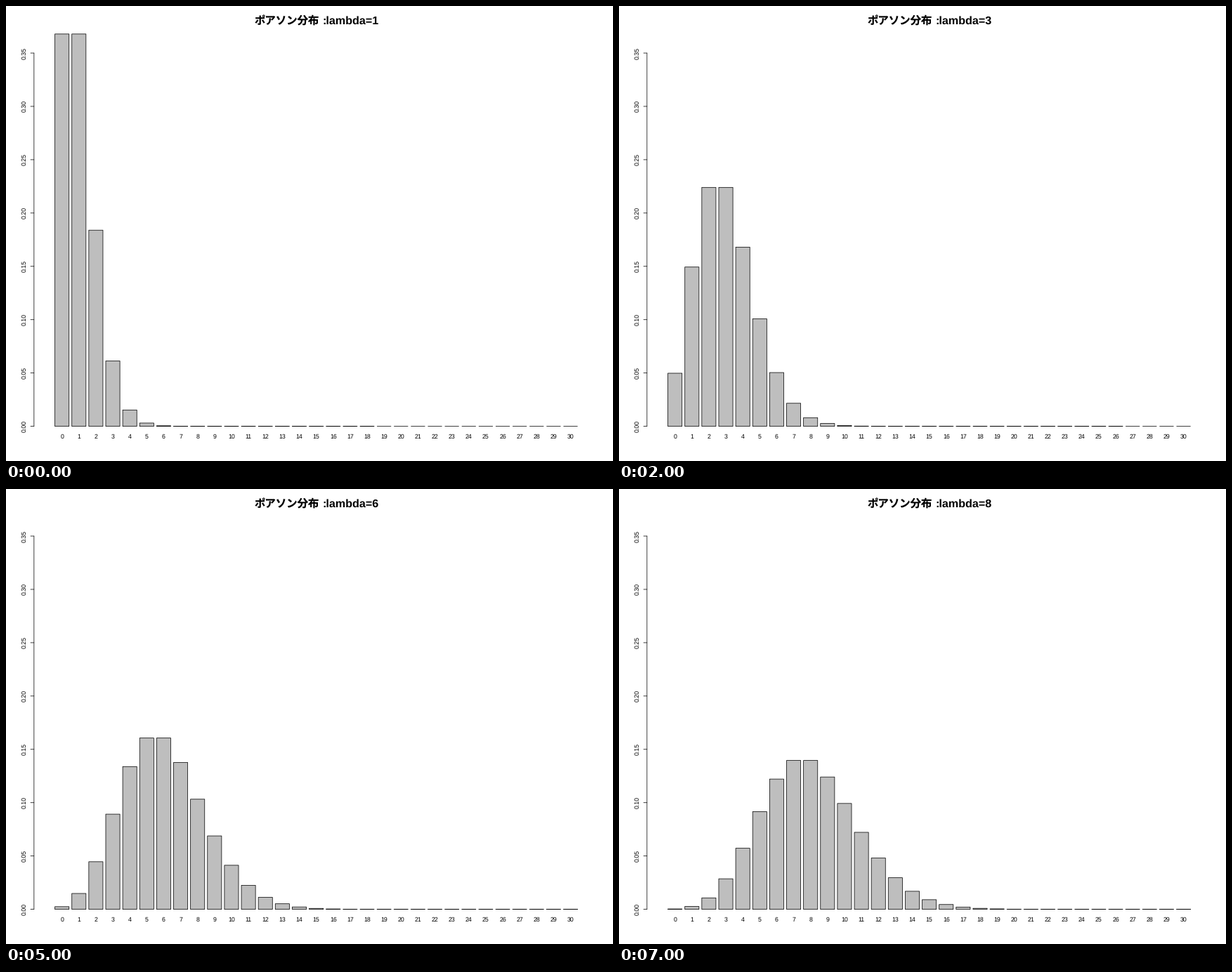
Animation, 864 px wide and 648 px high, one loop 8 s. Source, as a matplotlib script:

```python
import math

import matplotlib.pyplot as plt
from matplotlib.animation import FuncAnimation
from matplotlib.patches import Rectangle

W, H = 864, 648
LEFT, PITCH, BAR_W = 69.6, 24.13, 20.11
BASE, SCALE = 598.6, 1518.8
AXIS_X, TICK = 39.85, 4.85
STROKE = dict(lw=0.75, snap=False)
LINE = dict(color="black", solid_capstyle="round", **STROKE)
LABEL = dict(family="Liberation Sans", fontsize=8.8, ha="center",
             va="baseline", rotation_mode="anchor")
TITLE = dict(weight="bold", ha="left", va="baseline")

plt.rcParams["text.hinting"] = "none"
plt.rcParams["toolbar"] = "None"


def poisson(k, lam):
    return math.exp(-lam) * lam ** k / math.factorial(k)


fig = plt.figure(figsize=(W / 72, H / 72), dpi=72, facecolor="white")
ax = fig.add_axes([0, 0, 1, 1])
ax.set_xlim(0, W)
ax.set_ylim(H, 0)
ax.axis("off")

# Vertical axis
ax.plot([AXIS_X] * 2, [BASE, BASE - 0.35 * SCALE], **LINE)
for i in range(8):
    y = BASE - 0.05 * i * SCALE
    ax.plot([AXIS_X - TICK, AXIS_X], [y, y], **LINE)
    ax.text(28.6, y, f"{0.05 * i:.2f}", rotation=90, **LABEL)

# Bars and their labels
bars = []
for k in range(31):
    x = LEFT + k * PITCH
    bar = Rectangle((x, BASE), BAR_W, 0, fc="#bebebe", ec="black",
                    joinstyle="round", **STROKE)
    bars.append(ax.add_patch(bar))
    ax.text(x + BAR_W / 2, 615.6, str(k), **LABEL)

ax.text(354, 26, "ポアソン分布", fontsize=15.4,
        family="Noto Sans CJK JP", **TITLE)
title = ax.text(450, 26, "", fontsize=16.1, family="Liberation Sans", **TITLE)


def update(i):
    lam = i + 1
    title.set_text(f":lambda={lam}")
    for k, bar in enumerate(bars):
        bar.set_height(-poisson(k, lam) * SCALE)
    return bars + [title]


anim = FuncAnimation(fig, update, frames=8, interval=1000, repeat=True,
                     repeat_delay=0, blit=False)
plt.show()
```
